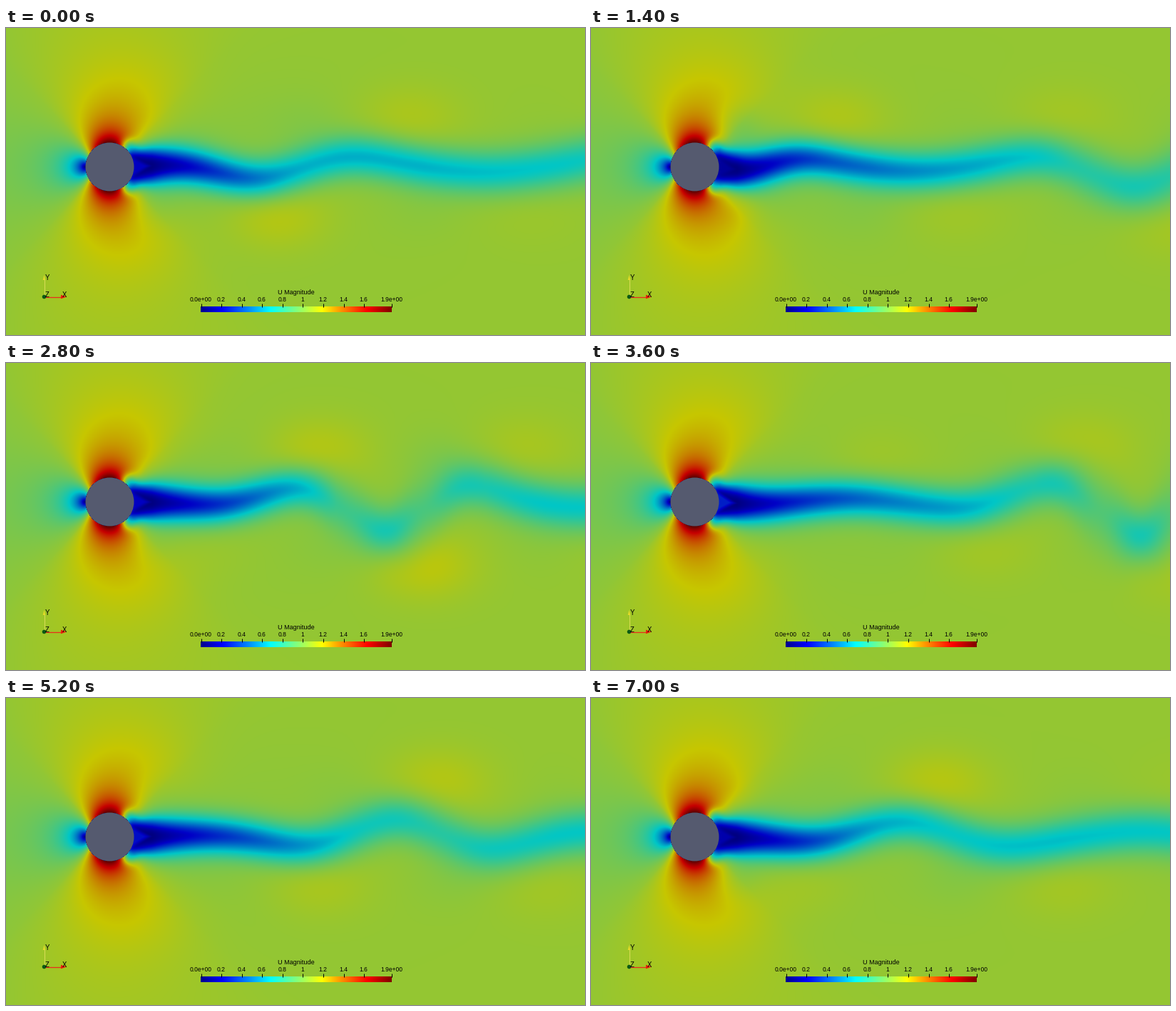
A matplotlib script that plays this animation: 812 by 430 pixels, repeating every 7.2 s.

```python
import numpy as np
import matplotlib.pyplot as plt
from matplotlib.animation import FuncAnimation
from matplotlib.patches import Circle, Polygon

W, H, DPI = 812, 430, 64
FRAMES, STEP_MS = 36, 200
HELD = 9            # this step repeats the picture before it
CX, CY, R = 145.5, 194.5, 34
SPEED = 60          # downstream drift of the wake per step, px
HALF_WAVE = 153.2   # from a crest of the wake to the next trough, px
U0, UMAX = 1.065, 1.875
BAR_X0, BAR_X1 = 273, 541

plt.rcParams["font.family"] = "Liberation Sans"

xs, ys = np.arange(W) + .5, np.arange(H) + .5
X, Y = np.meshgrid(xs - CX, ys - CY)


def jet(v):
    v = np.clip(v / UMAX, 0, 1)
    red = np.interp(v, [.365, .635, .873, 1], [0, 1, 1, .5])
    green = np.interp(v, [.111, .365, .635, .873], [0, 1, 1, 0])
    blue = np.interp(v, [0, .111, .365, .635], [.56, 1, 1, 0])
    return np.stack([red, green, blue], axis=-1)


def smooth(x, a, b):
    t = np.clip((x - a) / (b - a), 0, 1)
    return t * t * (3 - 2 * t)


def bump(x, y, sx, sy):
    gx = np.exp(-((xs - x) / sx) ** 2)
    gy = np.exp(-((ys - y) / sy) ** 2)
    return gy[:, None] * gx


# The wake is a slowly modulated wave, in a coordinate xi that drifts with it.

def phase_shift(xi):
    return -45 * np.sin(2 * np.pi * (xi + 420) / 2440)


def envelope(xi):
    beat = (1 + np.cos(2 * np.pi * (xi + 300) / 656)) / 2
    return 8 + 22 * beat ** 1.5 + 24 * np.exp(-((xi + 220) / 120) ** 2)


def wave(xi):
    return -envelope(xi) * np.cos(np.pi * (xi - phase_shift(xi) - 840) / HALF_WAVE)


def growth(x):
    return 1 - np.exp(-np.maximum(x - 180, 0) / 230)


def outer_flow():
    """Potential flow round a cylinder, with softened peaks."""
    z = X + 1j * Y
    z = np.where(abs(z) < R, R, z)
    e = abs(1 - R * R / z ** 2) - 1
    u = U0 + np.where(e > 0, .85 * np.maximum(e, 0) ** .8, U0 * e)
    u -= .55 * np.exp(-((X - 26) / 12) ** 2 - ((abs(Y) - 27) / 11) ** 2)
    u += .04 * (bump(205, 95, 75, 60) + bump(205, 294, 75, 60))
    return u - .02 * np.exp(-xs / 70)


OUTER = outer_flow()
CORE = .04 + .68 * (1 - np.exp(-np.maximum(xs - 205, 0) / 190))
WIDTH = 23 + .014 * (xs - 180)
POWER = 1.8 + 2.2 * np.exp(-np.maximum(xs - 175, 0) / 25)
START = smooth(xs, 155, 173)
SHEAR = 26 * (1 - (xs - 168) / 45)    # half-height of the pocket behind the cylinder


def add_patches(u, n):
    """Fast and slow patches on either side of each bend."""
    for k in range(19):
        xi = 840 - HALF_WAVE * k
        xi += phase_shift(xi)
        x = xi + SPEED * n
        if not 180 < x < W + 150:
            continue
        side = 1 if k % 2 else -1
        a = envelope(xi)
        f = smooth(x, 190, 290) * (1 - .5 * smooth(x, 450, 750)) * np.tanh(a / 30)
        px = x + 35 + 25 * smooth(x, 280, 500)
        u += .125 * f * bump(px, CY + side * (58 + .8 * a * growth(x)), 72, 46)
        u -= .04 * f * bump(x + 80, CY - side * 55, 60, 45)


def speed_field(n):
    u = OUTER.copy()
    tilt = np.tanh(wave(280 - SPEED * n) / 25)
    u += .09 * tilt * (bump(203, 135, 32, 30) - bump(203, 254, 32, 30))
    add_patches(u, n)

    xi = xs - SPEED * n
    line = wave(xi) * growth(xs)
    steep = np.gradient(line) ** 2
    mix = np.maximum(envelope(xi) - 10, 0)
    core = np.minimum(CORE + .006 * mix * smooth(xs, 240, 420), .74) + .18 * steep
    width = (WIDTH + .12 * mix * smooth(xs, 300, 560)) * (1 + .5 * steep)
    eta = abs(Y - line)
    u += (core - u) * START * np.exp(-(eta / width) ** POWER)

    pocket = smooth(SHEAR - eta, 3, 12) * (X > 0)
    return u + .25 * (1 - abs(tilt)) * pocket


fig = plt.figure(figsize=(W / DPI, H / DPI), dpi=DPI)
ax = fig.add_axes([0, 0, 1, 1])
ax.axis("off")


def label(x, y, s, px):
    ax.text(x, y, s, fontsize=px * 72 / DPI, color="black",
            ha="center", va="center_baseline", zorder=6)


def stroke(x, y, color, width=1):
    ax.plot(x, y, color=color, lw=width * 72 / DPI, solid_capstyle="butt", zorder=4)


field = ax.imshow(np.zeros((H, W, 3)), extent=(0, W, H, 0), aspect="auto",
                  interpolation="nearest")
ax.add_patch(Circle((CX, CY), R, fc="#555a6f", ec="none", zorder=3))

# Colour legend
ramp = jet(np.linspace(0, UMAX, BAR_X1 - BAR_X0))[None]
ax.imshow(ramp, extent=(BAR_X0, BAR_X1, 398, 390), aspect="auto",
          interpolation="nearest", zorder=3)
label(406.5, 369.5, "U Magnitude", 9)
for value in [*np.arange(0, 1.7, .2), UMAX]:
    x = BAR_X0 + (BAR_X1 - BAR_X0) * value / UMAX
    at_end = value in (0, UMAX)
    label(x, 379.7, f"{value:.1e}" if at_end else f"{value:.2g}", 8.5)
    x = min(int(x), BAR_X1 - 1) + .5
    stroke([x, x], [386, 391], "black")

# Axis triad
stroke([53.5, 53.5], [376, 352], "#d9dc55")
stroke([54, 79], [376.5, 376.5], "#e8301c", 1.3)
ax.add_patch(Polygon([(77, 373.7), (77, 379.3), (85, 376.5)], fc="#e8200c", zorder=4))
ax.add_patch(Polygon([(51.7, 353), (55.3, 353), (53.5, 346)], fc="#e6dc28", zorder=4))
ax.add_patch(Circle((53.5, 376.5), 2.8, fc="#0c5a14", ec="none", zorder=5))
label(57.5, 349, "Y", 9.5)
label(81.5, 373, "X", 9.5)
label(58, 372.7, "Z", 9.5)

ax.set_xlim(0, W)
ax.set_ylim(H, 0)


def update(i):
    n = i - (i >= HELD)
    field.set_data(np.clip(.78 * jet(speed_field(n)), 0, 1))
    return [field]


anim = FuncAnimation(fig, update, frames=FRAMES, interval=STEP_MS,
                     repeat=True, repeat_delay=0)
plt.show()
```
